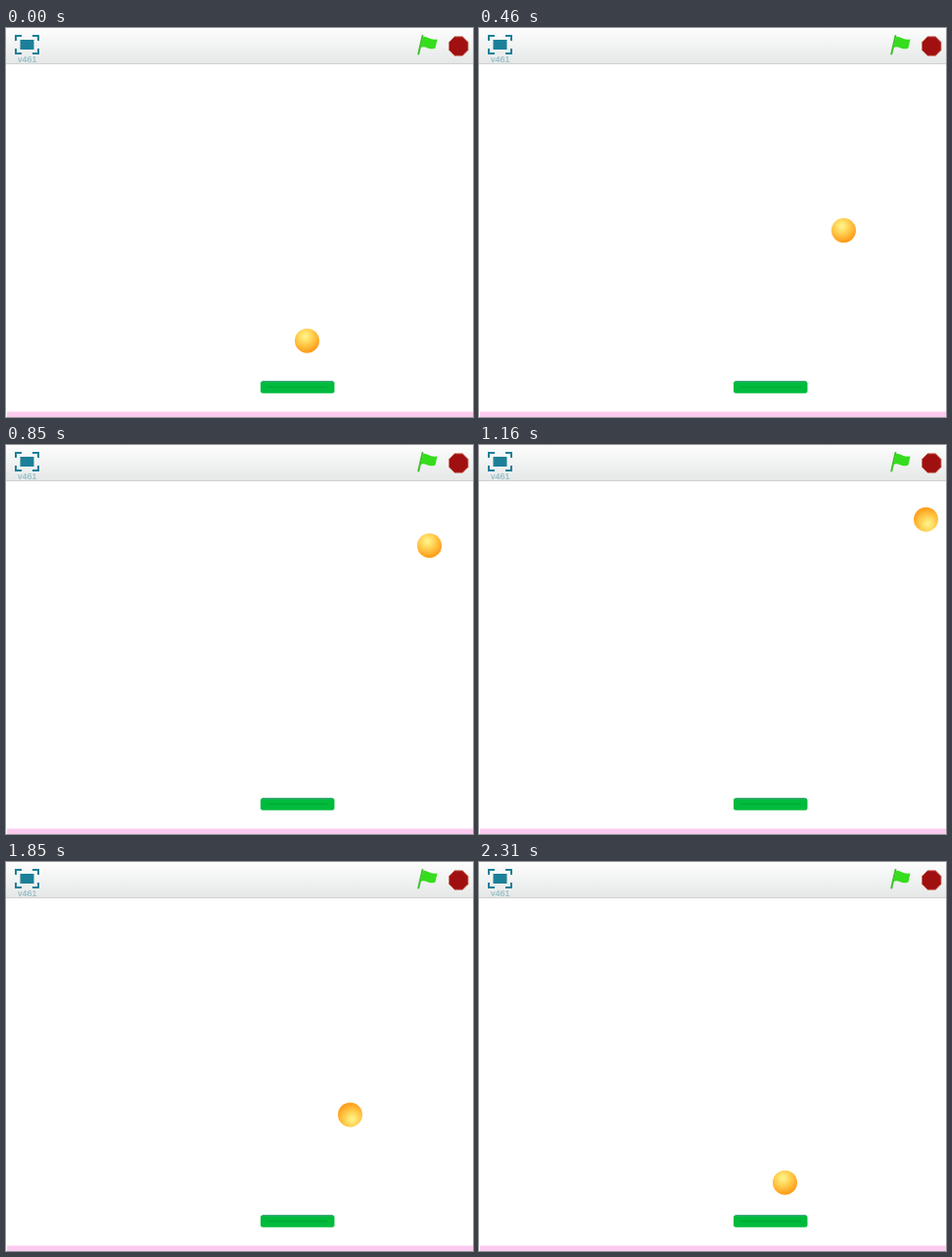
These frames come from a looping animation (477x397 px, 2.39 s). An HTML page:

```html
<!DOCTYPE html>
<html lang="en">
<head>
<meta charset="utf-8">
<title>Bouncing ball</title>
<style>
  html, body { margin: 0; width: 100%; height: 100%; overflow: hidden; background: #fff; }
  svg { display: block; }
  text { font: 9px "Liberation Sans", Arial, sans-serif; }
</style>
</head>
<body>
<svg width="477" height="397" viewBox="0 0 477 397">
  <defs>
    <linearGradient id="bar" x2="0" y2="1">
      <stop offset="0" stop-color="#fdfdfd"/>
      <stop offset="1" stop-color="#e6e8e8"/>
    </linearGradient>
    <radialGradient id="shine" gradientUnits="userSpaceOnUse" cx="-2" cy="-4.5" r="16">
      <stop offset="0" stop-color="#fff590"/>
      <stop offset=".25" stop-color="#ffe46e"/>
      <stop offset=".6" stop-color="#ffc544"/>
      <stop offset="1" stop-color="#ff9e1c"/>
    </radialGradient>
  </defs>

  <rect width="477" height="36" fill="url(#bar)"/>
  <rect y="36" width="477" height="1" fill="#cfd0d0"/>

  <g fill="none" stroke="#1c8098" stroke-width="2">
    <path d="M10 13V8H16M27 8H33V13M33 21V26H27M16 26H10V21"/>
    <rect x="14.5" y="12" width="14" height="10" fill="#1c8098" stroke="none"/>
  </g>
  <text x="12" y="35" fill="#93bcc4" stroke="#93bcc4" stroke-width=".2">v461</text>

  <path d="M425.5 8L421.3 26.5" stroke="#3fc02c" stroke-width="2" stroke-linecap="round"/>
  <path d="M426 9.5C430 7.5 432 13 440.5 11.5L438.5 20.5C431 23.5 429 17.5 423.5 20Z" fill="#35dd1d"/>
  <path d="M458.2 8.8H466.3L472 14.5V22.6L466.3 28.3H458.2L452.5 22.6V14.5Z" fill="#a01010" stroke="#c9705c" stroke-width=".8"/>

  <rect x="1" y="391.5" width="476" height="5.5" fill="#fdcbf0"/>
  <rect x="260" y="360.3" width="75.5" height="12.4" rx="2.5" fill="#00bb3c"/>
  <path d="M262 360.8H333.5" stroke="#4a9c8a"/>
  <path d="M267 366.5H329" stroke="#00aa36" stroke-width="1.5"/>

  <circle id="ball" r="12.5" fill="url(#shine)"/>
</svg>
<script>
  const LOOP = 2390, TICK = 77, LAST = 30;
  const DX = 5, DY = 8.66;
  const ball = document.getElementById("ball");
  const start = performance.now();

  // Straight legs: first step, position there, direction (1 = up right, -1 = down left)
  const legs = [
    { step: 0, x: 307.5, y: 319.2, dir: 1 },
    { step: 32, x: 466.5, y: 58.7, dir: -1 },
    { step: 67, x: 302.5, y: 344.5, dir: 1 }
  ];

  // Ticks fall on multiples of 10 ms
  const tickTime = n => Math.round(TICK * n / 10) * 10;

  function draw() {
    const t = (performance.now() - start) % LOOP;
    let n = LAST;
    while (tickTime(n) > t) n--;

    // The ball moves 30 steps a second, seen once per tick
    const step = Math.floor(2.31 * n + 0.05);
    const leg = legs.findLast(l => l.step <= step);
    const d = (step - leg.step) * leg.dir;
    const x = leg.x + DX * d, y = leg.y - DY * d;
    ball.setAttribute("transform", `translate(${x} ${y}) rotate(${leg.dir > 0 ? 0 : 180})`);
    requestAnimationFrame(draw);
  }
  draw();
</script>
</body>
</html>
```
